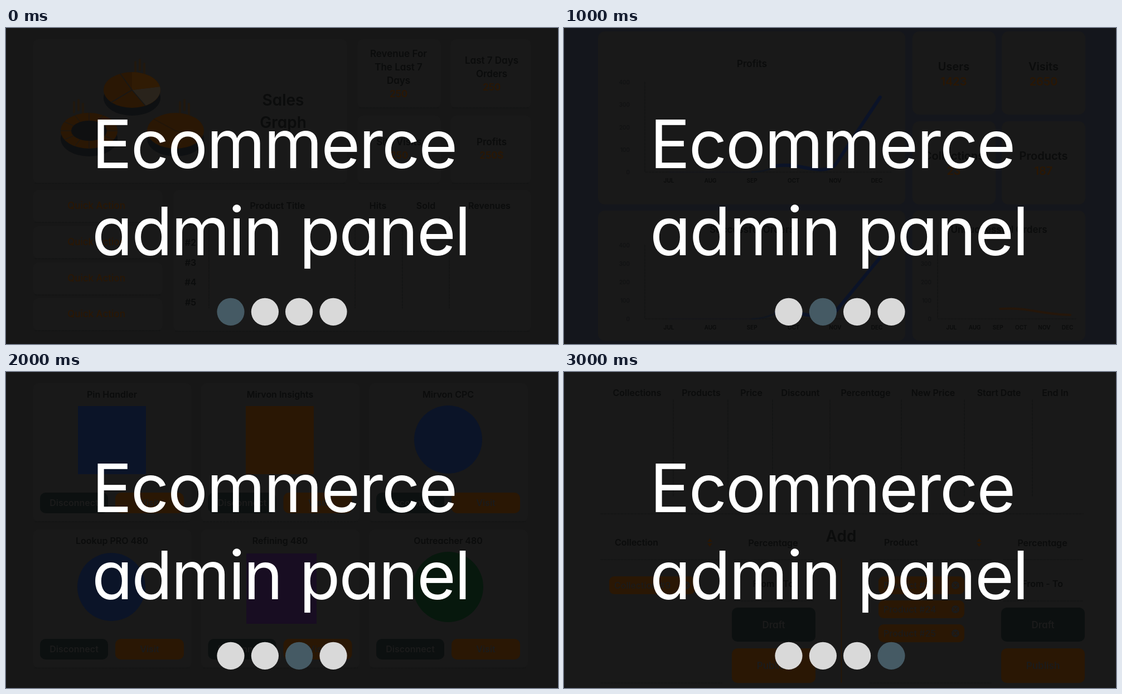
Recreate the animation shown at these times as an HTML page. Size 990 by 566 pixels, loop 4 s.

```html
<!DOCTYPE html>
<html lang="en">
<head>
<meta charset="utf-8">
<title>Ecommerce admin panel</title>
<style>
html, body { margin: 0; width: 100%; height: 100%; overflow: hidden; background: #171717; }
svg { display: block; width: 100%; height: 100%; }
text { font-family: Inter, Lato, sans-serif; font-weight: 600; font-feature-settings: "cv11"; font-optical-sizing: none; }
.title { font-size: 120px; font-weight: 400; letter-spacing: -2.3px; fill: #fff; }
</style>
</head>
<body>
<svg viewBox="0 0 990 566">
  <g id="pages"></g>
  <text class="title" x="154" y="251">Ecommerce</text>
  <text class="title" x="154" y="407">admin panel</text>
  <g id="dots"></g>
</svg>
<script>
const BG = '#171717', CARD = '#191919', INK = '#0b0c0c', EDGE = '#111213', ORANGE = '#2a1704',
  BLUE = '#0b1428', GREEN = '#07180d', PURPLE = '#180d22', DARK = '#0c1010', PALE = '#1b1b1b';

const text = (x, y, s, size = 16, fill = INK, anchor = 'middle', weight = 600) =>
  `<text x="${x}" y="${y}" font-size="${size}" fill="${fill}" text-anchor="${anchor}" style="font-weight:${weight}">${s}</text>`;
const rect = (x, y, r, b, fill, rx = 10) =>
  `<rect x="${x}" y="${y}" width="${r - x}" height="${b - y}" rx="${rx}" fill="${fill}"/>`;
const path = (d, stroke, width = 1, extra = '') =>
  `<path d="${d}" fill="none" stroke="${stroke}" stroke-width="${width}" stroke-linecap="round" ${extra}/>`;
const dashed = d => path(d, EDGE, 1, 'stroke-dasharray="4 2"');
const oval = (x, y, rx, ry, fill) => `<ellipse cx="${x}" cy="${y}" rx="${rx}" ry="${ry}" fill="${fill}"/>`;
const card = (x, y, r, b) => rect(x, y, r, b, CARD) + dashed(`M${x + 4} ${b}H${r - 4}`);
const button = (x, y, r, b, s, fill, size = 16) =>
  rect(x, y, r, b, fill) + text((x + r) / 2, (y + b) / 2 + size * .36, s, size, PALE);
const each = (list, fn) => list.map(fn).join('');

function pies() {
  const pie = (x, y) => oval(x, y + 14, 51, 32, '#0e1012') + oval(x, y, 51, 32, ORANGE);
  const flame = (x, y) => path(`M${x - 8} ${y - 9}v18M${x} ${y - 13}v18M${x + 8} ${y - 6}v18`, '#21180e', 4);
  return flame(240, 70) + flame(130, 142) + flame(320, 142) +
    pie(226, 111) +
    '<path d="M226 111L276 105A51 32 0 0 1 250 139Z" fill="#29231b"/>' +
    '<path d="M226 111L226 79A51 32 0 0 1 276 105Z" fill="#301b04"/>' +
    path('M226 111L189 133M226 111L250 139M226 111L205 82', BG, 1.5) +
    pie(149, 184) + oval(149, 184, 32, 18, '#0f1011') +
    each([...Array(12).keys()], i => {
      const c = Math.cos(i * Math.PI / 6), s = Math.sin(i * Math.PI / 6);
      return path(`M${149 + 32 * c} ${184 + 18 * s}L${149 + 51 * c} ${184 + 32 * s}`, BG);
    }) +
    pie(304, 184) + path('M304 184L265 163M304 184L352 194', '#20150a', 1.5);
}

function overview() {
  const stat = (x, y, lines, value) =>
    each(lines, (s, i) => text(x, y + i * 24, s, 17)) + text(x, y + lines.length * 24, value, 17, ORANGE);
  return rect(0, 0, 990, 566, BG) +
    card(48, 20, 612, 278) + pies() + text(497, 139, 'Sales', 28) + text(497, 179, 'Graph', 28) +
    each([[630, 20, 780, 143], [797, 20, 942, 143], [630, 157, 780, 278], [797, 157, 942, 278]], c => card(...c)) +
    stat(704, 52, ['Revenue For', 'The Last 7', 'Days'], '250') +
    stat(871, 64, ['Last 7 Days', 'Orders'], '250') +
    stat(705, 210, ['Site Visits'], '250') + stat(871, 210, ['Profits'], '250$') +
    each([324, 389, 454, 518], y => card(48, y - 34, 281, y + 24) + text(162, y, 'Quick Action', 17, ORANGE, 'middle', 500)) +
    card(300, 290, 942, 543) +
    text(487, 324, 'Product Title') + text(667, 324, 'Hits') + text(753, 324, 'Sold') + text(867, 324, 'Revenues') +
    each([1, 2, 3, 4, 5], n => text(331, 319 + n * 35.6, '#' + n)) +
    each([364, 626, 711, 795], x => dashed(`M${x} 338V502`));
}

function charts() {
  const stat = (x, y, name, value) => text(x, y, name, 20) + text(x, y + 27, value, 20, ORANGE);
  const axes = (x, top, base, right, months, from, gap) =>
    dashed(`M${x} ${top}V${base}H${right}`) +
    each([0, 100, 200, 300, 400], n => text(x - 27 + (x > 600 ? 16 : 0), base + 4 - n * (base - top) / 400, n, 10, EDGE, 'end', 500)) +
    each(months, (m, i) => text(from + i * gap, base + 19, m, 10));
  const months = ['JUL', 'AUG', 'SEP', 'OCT', 'NOV', 'DEC'];
  const curve = (y, top) =>
    path(`M188 ${y}H337`, '#14171f') +
    path(`M337 ${y}C370 ${y} 375 ${y - 14} 411 ${y - 14}`, '#11161f', 3) +
    path(`M380 ${y - 11}C425 ${y - 18} 458 ${y + 8} 486 ${y - 12}L567 ${top}`, '#0b1328', 6);
  return rect(0, 0, 990, 566, '#14161c') +
    each([[61, 6, 612, 316], [625, 6, 774, 155], [785, 6, 935, 155], [625, 167, 774, 316],
      [785, 167, 935, 316], [61, 327, 612, 560], [625, 327, 935, 560]], c => rect(...c, CARD, 12)) +
    text(337, 70, 'Profits', 17) + axes(145, 97, 258, 587, months, 188, 74.6) + curve(258, 124) +
    stat(699, 76, 'Users', '1423') + stat(860, 76, 'Visits', '2650') +
    stat(699, 236, 'Collections', '23') + stat(860, 236, 'Products', '187') +
    text(337, 367, 'Successful Orders', 17) + axes(145, 389, 521, 587, months, 188, 74.6) + curve(521, 411) +
    text(780, 367, 'Unsuccessful Orders', 17) + axes(670, 389, 521, 918, months, 695, 41.6) +
    path('M782 503C840 500 845 512 908 514', '#25160a', 4);
}

function tools() {
  const names = ['Pin Handler', 'Mirvon Insights', 'Mirvon CPC', 'Lookup PRO 480', 'Refining 480', 'Outreacher 480'];
  return rect(0, 0, 990, 566, BG) +
    each(names, (s, i) => {
      const x = 48 + i % 3 * 301.5, y = i < 3 ? 20 : 282;
      return card(x, y, x + 285, y + 248) + text(x + 142, y + 26, s, 16) +
        button(x + 13, y + 196, x + 135, y + 233, 'Disconnect', DARK) +
        button(x + 148, y + 196, x + 271, y + 233, 'Visit', ORANGE);
    }) +
    rect(129, 61, 251, 183, BLUE, 0) + rect(430, 61, 552, 183, ORANGE, 0) + oval(793, 121, 61, 61, BLUE) +
    oval(189, 385, 61, 61, BLUE) + rect(431, 325, 557, 451, PURPLE, 0) + oval(793, 385, 63, 63, GREEN);
}

function discounts() {
  const heads = [[131, 'Collections'], [246, 'Products'], [336, 'Price'], [424, 'Discount'],
    [541, 'Percentage'], [662, 'New Price'], [780, 'Start Date'], [881, 'End In']];
  const tag = (x, y, s) => rect(x, y, x + 154, y + 32, ORANGE, 9) + text(x + 9, y + 22, s, 16, PALE, 'start', 500) +
    oval(x + 138, y + 16, 7, 7, PALE) + path(`M${x + 135} ${y + 13}l6 6m0 -6l-6 6`, ORANGE, 1.5);
  const form = (x, name, tags) =>
    text(x + 30, 311, name, 16, INK, 'start') +
    `<path d="M${x + 196} 304l4.500 -6l4.500 6zm0 3l4.500 6l4.500 -6z" fill="${ORANGE}"/>` +
    text(x + 314, 312, 'Percentage') + text(x + 314, 385, 'From - To') +
    dashed(`M${x + 5} 336H${x + 222}M${x + 244} 336H${x + 386}M${x + 244} 410H${x + 386}M${x + 5} 557H${x + 222}`) +
    each(tags, (s, i) => tag(x + 20, 366 + i * 43, s)) +
    button(x + 240, 422, x + 390, 483, 'Draft', DARK, 17) + button(x + 240, 495, x + 390, 557, 'Publish', ORANGE, 17);
  return rect(0, 0, 990, 566, CARD) +
    each(heads, ([x, s]) => text(x, 43, s)) +
    each([196, 294, 374, 477, 605, 718, 840], x => dashed(`M${x} 50V223`)) +
    dashed('M66 254H931') + text(497, 304, 'Add', 28) + path('M497.500 335V556', ORANGE, 1.5) +
    form(61, 'Collection', ['Collection #9']) +
    form(544, 'Product', ['Product #23', 'Product #24', 'Product #25']);
}

const pages = document.getElementById('pages'), dots = document.getElementById('dots');
pages.innerHTML = each([overview, charts, tools, discounts], page => `<g>${page()}</g>`);
dots.innerHTML = each([403, 464.4, 525.6, 587], x => oval(x, 508.3, 24.6, 24.6, '#d9d9d9'));

function draw() {
  const current = Math.floor(performance.now() / 1000) % 4;
  [...pages.children].forEach((page, i) => page.style.display = i === current ? '' : 'none');
  [...dots.children].forEach((dot, i) => dot.setAttribute('fill', i === current ? '#455a64' : '#d9d9d9'));
  requestAnimationFrame(draw);
}
draw();
</script>
</body>
</html>
```
